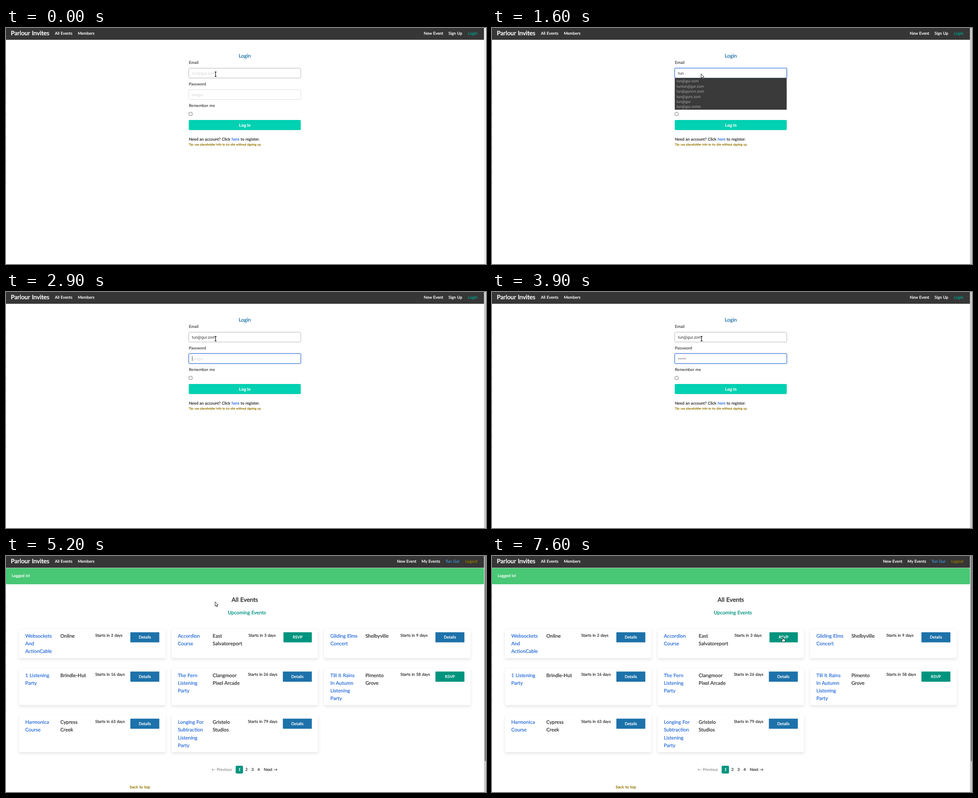
These frames come from a looping animation (1065x526 px, 8 s). An HTML page:

```html
<!DOCTYPE html>
<html lang="en">
<head>
<meta charset="utf-8">
<title>Login and events</title>
<style>
  html, body { margin: 0; width: 100%; height: 100%; overflow: hidden; background: #fff; }
  svg { display: block; width: 1065px; height: 526px; }
  text {
    font: 500 8.9px Lato, "Open Sans", sans-serif;
    word-spacing: .04em;
    text-rendering: geometricPrecision;
    white-space: pre;
    color: #363636;
    fill: currentColor;
    stroke: currentColor;
    stroke-width: .22px;
  }
  tspan { fill: currentColor; stroke: currentColor; }
  .label { font-weight: 600; font-size: 9px; stroke: none; }
  .form { font: 400 8.9px Roboto, sans-serif; word-spacing: 0; stroke: none; }
  .small { font: 400 8.3px Roboto, sans-serif; word-spacing: 0; stroke: none; }
  .hint { color: #d6d6d6; }
  .h1 { font-size: 13.4px; stroke-width: .4px; }
  .h2 { font-size: 11px; }
  .mid { text-anchor: middle; }
  .white { color: #fff; }
  .link { color: #3273dc; }
  .gold { color: #947600; }
  .teal { color: #00947e; }
  .card { fill: #fff; filter: drop-shadow(0 3px 3px rgba(10, 10, 10, .1)) drop-shadow(0 0 .6px rgba(10, 10, 10, .1)); }
  .box { fill: #fff; stroke: #dbdbdb; }
  .ring { fill: none; stroke: #3273dc; }
  .glow { fill: none; stroke: #3273dc; stroke-opacity: .25; stroke-width: 1.2; }
</style>
</head>
<body>
<svg id="stage" viewBox="0 0 1065 526" xmlns="http://www.w3.org/2000/svg"></svg>
<script>
const text = (x, y, s, cls = '', extra = '') => `<text x="${x}" y="${y}" class="${cls}" ${extra}>${s}</text>`;
const rect = (x, y, w, h, fill, r = 0, extra = '') =>
  `<rect x="${x}" y="${y}" width="${w}" height="${h}" rx="${r}" fill="${fill}" ${extra}/>`;
const group = (id, body) => `<g id="${id}">${body}</g>`;

const field = (id, y, hint) =>
  rect(405.5, y, 248.5, 22, '#fff', 2, `class="box" id="${id}Box"`) +
  group(id + 'Ring',
    rect(404.5, y - 1, 250.5, 24, 'none', 3, 'class="glow"') +
    rect(405.5, y, 248.5, 22, 'none', 2, 'class="ring"')) +
  text(412.6, y + 14.2, hint, 'form hint', `id="${id}Hint"`) +
  text(412.6, y + 14.2, '', 'form', `id="${id}Text"`) +
  rect(0, y + 5.5, .8, 11, '#333', 0, `id="${id}Caret"`);

const loginPage =
  text(927, 14.6, 'New Event', 'white') + text(981.7, 14.6, 'Sign Up', 'white') +
  text(1025, 14.6, 'Login', '', 'style="color:#009e86"') +
  text(529.8, 65.7, 'Login', 'h2 mid', 'style="color:#1d72aa;font-size:11.4px"') +
  text(405.7, 80.2, 'Email', 'label') + field('email', 89.5, 'tun@gur.zom') +
  text(405.7, 128.2, 'Password', 'label') + field('pass', 137.3, 'tungur') +
  text(405.7, 176.1, 'Remember me', 'label') +
  rect(406, 188, 7, 7, '#fff', 1, 'stroke="#777"') +
  group('submit', rect(405.5, 205, 248.5, 22.6, '#00d1b2', 2) +
    text(529.8, 219.7, 'Log In', 'form mid white', 'style="font-weight:600;font-size:9.3px"')) +
  text(405.7, 251.2, 'Need an account? Click <tspan class="link">here</tspan> to register.') +
  text(405.7, 262.4, 'Tip: use placeholder info to try site without signing up.', 'gold', 'style="font-size:6.66px"') +
  group('popup', '') +
  group('status', rect(-2, 513.5, 224.5, 15, '#303030', 2, 'stroke="#222"') +
    text(1.5, 523.2, '', 'small', 'id="statusText" style="color:#eee"'));

// column, card top, title lines, place lines, days, RSVP?
const events = [
  [0, 162.5, 'Websockets|And|ActionCable', 'Online', 2],
  [1, 162.5, 'Accordion|Course', 'East|Salvatoreport', 3, true],
  [2, 162.5, 'Gliding Elms|Concert', 'Shelbyville', 9],
  [0, 250.2, '1 Listening|Party', 'Brindle-Hut', 16],
  [1, 250.2, 'The Fern|Listening|Party', 'Clangmoor|Pixel Arcade', 26],
  [2, 250.2, 'Till It Rains|In Autumn|Listening|Party', 'Pimento|Grove', 58, true],
  [0, 355, 'Harmonica|Course', 'Cypress|Creek', 63],
  [1, 355, 'Longing For|Subtraction|Listening|Party', 'Gristelo|Studios', 79]
];
const lines = (x, y, s, cls) =>
  s.split('|').map((line, i) => text(x, y + i * 17.1, line, 'h2 ' + cls)).join('');

const card = ([col, y, title, place, days, rsvp]) => {
  const x = 29 + col * 338.5;
  const nudge = rsvp && col === 1 ? 1.3 : 0;
  const btn = [275.9, 614.3, 952.8][col] + nudge;
  const w = 64.3 - nudge;
  return rect(x, y, 325, y < 200 ? 65.3 : 82.2, '#fff', 2, 'class="card"') +
    lines(x + 13.7, y + 19.3, title, 'link') +
    lines([120.5, 458.6, 797.4][col], y + 19.3, place, '') +
    text([198, 536.7, 875][col] + nudge, y + 17, `Starts in ${days} days`) +
    rect(btn, y + 7.4, w, 22.6, rsvp ? '#00947e' : '#1d72aa', 1) +
    text(btn + w / 2, y + 21.8, rsvp ? 'RSVP' : 'Details', 'mid white');
};

const eventsPage =
  text(867.6, 14.6, 'New Event', 'white') + text(922, 14.6, 'My Events', 'white') +
  text(975, 14.6, 'Tun Gur', '', 'style="color:#3e8ed0"') + text(1019, 14.6, 'Logout', 'gold') +
  rect(0, 27, 1060.5, 35.9, '#48c774', 2) + text(12.8, 47.4, 'Logged in!', 'white') +
  text(529.8, 102, 'All Events', 'h1 mid') +
  text(534.4, 130, 'Upcoming Events', 'h2 mid teal') +
  events.map(card).join('') +
  text(456, 478.8, '← Previous', '', 'style="color:#9a9a9a"') +
  rect(509.6, 467.6, 16.2, 17.2, '#00947e', 2) +
  text(518, 478.8, '1', 'mid white', 'style="font-style:italic;font-weight:700"') +
  [2, 3, 4].map((n, i) => text(533.7 + i * 13.5, 478.8, n, 'mid')).join('') +
  text(572, 478.8, 'Next →') +
  text(274.8, 518, 'back to top', 'gold') +
  rect(1062, 0, 3, 457, '#7f7f7f');

const cursors =
  group('ibeam', '<path d="M-2-5H2M-2 5H2M0-5V5" fill="none" stroke="#fff" stroke-width="2.6"/>' +
    '<path d="M-2-5H2M-2 5H2M0-5V5" fill="none" stroke="#222" stroke-width="1.3"/>') +
  group('arrow', '<path d="M.5.5V10.2L2.7 8.2 4.3 11.8 5.9 11.1 4.3 7.6H7Z" fill="#fff" stroke="#222" stroke-width="1"/>') +
  group('hand', '<path d="M-1.6-5Q-.7-6 .2-5V-1.6L3.6-.8Q4.6-.4 4.4 1L3.6 5H-1.4L-4 1.2Q-3.6-.2-1.6 1Z" fill="#fff" stroke="#222" stroke-width="1"/>');

const ticks = Array.from({ length: 11 }, (_, i) => rect(0, 87.5 + i * 25.6, 1, 5, '#e2e2e2')).join('');

const stage = document.getElementById('stage');
stage.innerHTML =
  rect(0, 0, 1065, 526, '#fff') + ticks +
  rect(1060.5, 0, 4.5, 526, '#ececec', 0, 'id="scroll"') +
  rect(0, 0, 1060.5, 26.3, '#363636') +
  text(10.8, 16, 'Parlour Invites', 'h1 white') +
  text(108.4, 14.6, 'All Events', 'white') + text(159.4, 14.6, 'Members', 'white') +
  group('login', loginPage) + group('events', eventsPage) + cursors;

const ui = {};
stage.querySelectorAll('[id]').forEach(el => ui[el.id] = el);

const user = 'tun@gur';
const mail = user + '.zom';
const byUse = [mail, 'tun' + mail, user + 'vvv.zom', user + 's.zom', user, mail + 's'];
const byPrefix = [mail, user, mail + 's', user + 's.zom', user + 'vvv.zom', 'tun' + mail];
const short = [mail, mail + 's', 'tun' + mail];
const host = 'fast-citadel-83141.herokuapp.com';

// Each step changes part of the state and keeps the rest.
const steps = [
  [0, { page: 'login', email: '', pass: 0, emailRing: 0, passRing: 0, caret: '', list: [],
        scroll: '#ececec', busy: false, status: '', cursor: ['ibeam', 465, 103] }],
  [400, { emailRing: .5, scroll: '#dcdcdc' }],
  [500, { emailRing: 1, scroll: '#cbcbcb' }],
  [700, { cursor: ['ibeam', 465, 104] }],
  [1200, { email: mail.slice(0, 1), caret: 'email' }],
  [1300, { list: byUse, cursor: ['arrow', 463.5, 101.6] }],
  [1400, { email: mail.slice(0, 2) }],
  [1500, { email: mail.slice(0, 3) }],
  [1600, { caret: '' }],
  [1800, { email: mail.slice(0, 4), list: byPrefix }],
  [2100, { email: mail.slice(0, 5), caret: 'email' }],
  [2200, { email: mail.slice(0, 6) }],
  [2300, { email: user }],
  [2400, { email: user + '.', list: short, caret: '' }],
  [2500, { caret: 'email' }],
  [2900, { email: mail, list: [], emailRing: 0, passRing: 1, caret: 'pass', cursor: ['ibeam', 465, 104] }],
  [3200, { pass: 1 }],
  [3400, { pass: 3 }],
  [3700, { pass: 5 }],
  [3900, { pass: 6, caret: '' }],
  [4200, { busy: true, status: `Waiting for ${host}…` }],
  [4900, { status: `Read ${host}`, cursor: ['arrow', 463.5, 101.6] }],
  [5200, { page: 'events' }],
  [6900, { cursor: ['arrow', 574.6, 100.6] }],
  [7300, { cursor: ['arrow', 652.6, 161.8] }],
  [7600, { cursor: ['hand', 646, 186.5] }]
];

const show = (el, on) => { el.style.display = on ? '' : 'none'; };

function drawField(id, value, ring, caret) {
  const label = ui[id + 'Text'];
  label.textContent = value;
  show(ui[id + 'Hint'], !value);
  ui[id + 'Ring'].style.opacity = ring;
  show(ui[id + 'Caret'], caret === id);
  ui[id + 'Caret'].setAttribute('x', 412.8 + (value ? label.getComputedTextLength() : 0));
}

function draw(s) {
  show(ui.login, s.page === 'login');
  show(ui.events, s.page === 'events');
  ui.scroll.style.fill = s.scroll;
  drawField('email', s.email, s.emailRing, s.caret);
  drawField('pass', '•'.repeat(s.pass), s.passRing, s.caret);
  ui.emailBox.style.stroke = '#b5b5b5';
  ui.popup.innerHTML = s.list.length
    ? rect(405.5, 111.3, 248.3, s.list.length * 11.4 + 2.4, '#3a3a3a') +
      s.list.map((item, i) => text(409.4, 121.4 + i * 11.4, item, 'small', 'style="color:#a6a6a6"')).join('')
    : '';
  ui.submit.style.opacity = s.busy ? .5 : 1;
  show(ui.status, s.status);
  ui.statusText.textContent = s.status;
  const [kind, x, y] = s.cursor;
  for (const id of ['ibeam', 'arrow', 'hand']) show(ui[id], id === kind);
  ui[kind].setAttribute('transform', `translate(${x} ${y})`);
}

let last = -1;
function tick() {
  const t = performance.now() % 8000;
  const now = steps.filter(([at]) => at <= t);
  if (now.length !== last) {
    last = now.length;
    draw(Object.assign({}, ...now.map(step => step[1])));
  }
  requestAnimationFrame(tick);
}
tick();
</script>
</body>
</html>
```
